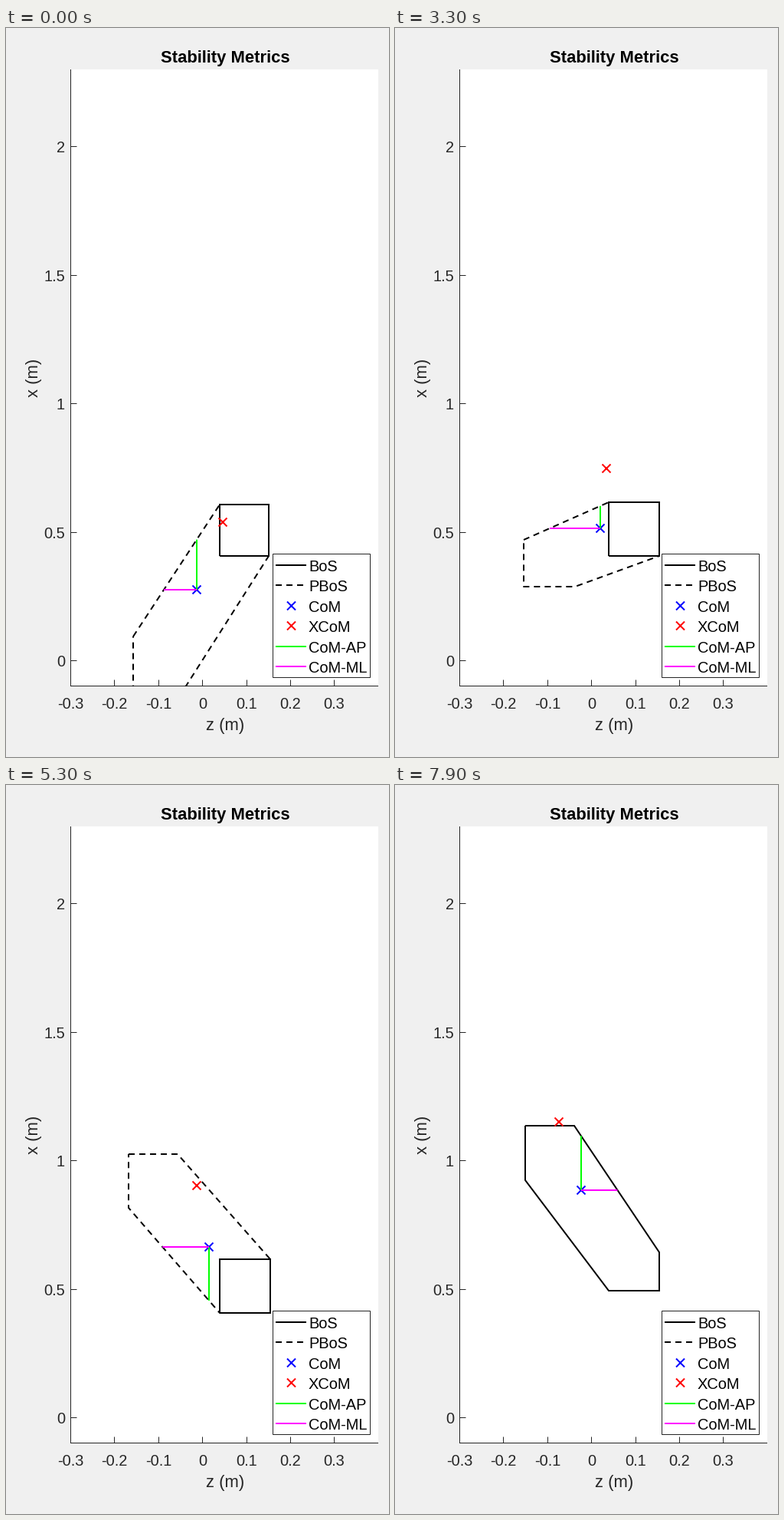
A matplotlib script for the animation above (8 s loop, 500 px wide and 950 px high).

```python
import numpy as np
import matplotlib.pyplot as plt
from matplotlib.animation import FuncAnimation
from matplotlib.patches import Rectangle

W, H, DPI = 500, 950, 100
FRAMES, HOLD, SPAN = 80, 4, 75
HEEL_OFF, CONTACT = 57, 68
PT = 72 / DPI
INK = "#262626"
LEFT, RIGHT, TOP, BOTTOM = 84.5, 486, 54, 857.5

plt.rcParams["font.family"] = "Liberation Sans"
plt.rcParams["path.snap"] = False
fig = plt.figure(figsize=(W / DPI, H / DPI), dpi=DPI, facecolor="#f0f0f0")
ax = fig.add_axes([0, 0, 1, 1])
ax.set_xlim(0, W)
ax.set_ylim(H, 0)
ax.axis("off")


# ---- motion, in pixels against the step number 0..SPAN ----

def poly(*keys):
    """Polynomial through evenly spaced key values."""
    return np.poly1d(np.polyfit(np.linspace(0, SPAN, len(keys)), keys, len(keys) - 1))


def glide(*keys):
    """Smooth cubic path through evenly spaced key values."""
    slope = np.gradient(keys)

    def at(s):
        u = s / SPAN * (len(keys) - 1)
        i = min(int(u), len(keys) - 2)
        u -= i
        ease = u * u * (3 - 2 * u)
        return (keys[i] + (keys[i + 1] - keys[i]) * ease
                + u * (1 - u) * ((1 - u) * slope[i] - u * slope[i + 1]))
    return at


com_path = poly(248.5, 267.2, 265, 243.5), poly(731.5, 662, 599, 528.5)
xcom_path = poly(282.5, 279.5, 248, 214.5), poly(643.5, 595.5, 553.6, 499.5, 438.5)
swing_path = (
    glide(166.3, 166.5, 169.5, 164, 160.5, 170, 170),
    glide(233.5, 233.5, 237.5, 226.5, 224, 233, 233.5),
    glide(793, 776, 702, 583.5, 475.5, 447.8, 444),
    glide(859, 822, 758, 653, 545, 517.3, 514.5),
)


def snap(v):
    return float(np.floor(v + 0.5))


def at_step(path, s):
    return tuple(snap(f(s)) for f in path)


def corners(l, r, t, b):
    return [(l, b), (l, t), (r, t), (r, b)]


def stance_foot(s):
    settle = 3 * np.exp(-s / 4)
    rise = 0.091 * max(0, s - HEEL_OFF) ** 2
    edges = 279, 344.7 - 0.7 * settle, 618 + settle - 0.3 * rise, 688 - rise
    return corners(*map(snap, edges))


def swing_foot(s):
    return corners(*at_step(swing_path, s))


# ---- geometry ----

def turn(a, b, c):
    return (b[0] - a[0]) * (c[1] - a[1]) - (b[1] - a[1]) * (c[0] - a[0])


def hull(points):
    def chain(pts):
        out = []
        for p in pts:
            while len(out) > 1 and turn(out[-2], out[-1], p) <= 0:
                out.pop()
            out.append(p)
        return out[:-1]

    pts = sorted(points)
    return chain(pts) + chain(pts[::-1])


def nearest_edge(outline, p, axis):
    """Closest crossing of the outline on the line through p with p[axis] fixed."""
    other = 1 - axis
    hits = []
    for a, b in zip(outline, outline[1:] + outline[:1]):
        da, db = a[axis] - p[axis], b[axis] - p[axis]
        if da * db < 0:
            hits.append(a[other] + (b[other] - a[other]) * da / (da - db))
    return min(hits, key=lambda v: abs(v - p[other]), default=p[other])


def closed(outline):
    return zip(*(outline + outline[:1]))


def cross(x, y, r=5.5):
    return [x - r, x + r, np.nan, x - r, x + r], [y - r, y + r, np.nan, y + r, y - r]


# ---- drawing ----

def label(x, y, s, size=20, **kw):
    kw = {"color": INK, "ha": "center", **kw}
    ax.text(x, y, s, fontsize=size * PT, va="baseline", zorder=8, **kw)


def line(xs, ys, color, width=2, **kw):
    return ax.plot(xs, ys, color=color, lw=width * PT, solid_capstyle="butt",
                   dash_capstyle="butt", solid_joinstyle="miter", **kw)[0]


STYLES = [
    ("BoS", "#000000", "-"),
    ("PBoS", "#000000", (0, (4, 3))),
    ("CoM", "#0000ff", "-"),
    ("XCoM", "#ff0000", "-"),
    ("CoM-AP", "#00ff00", "-"),
    ("CoM-ML", "#ff00ff", "-"),
]


def draw_axes():
    ax.add_patch(Rectangle((LEFT, TOP), RIGHT - LEFT, BOTTOM - TOP, fc="white", lw=0, zorder=0))
    axis = dict(color=INK, width=1, zorder=1)
    line([LEFT, LEFT], [TOP, BOTTOM + 0.5], **axis)
    line([LEFT, RIGHT], [BOTTOM, BOTTOM], **axis)
    for i in range(-3, 4):
        x = np.floor(256.7 + 57.4 * i) + 0.5
        line([x, x], [BOTTOM, BOTTOM - 8], **axis)
        label(x, 887, f"{i / 10:g}")
    for i in range(5):
        y = np.floor(824.5 - 167.5 * i) + 0.5
        line([LEFT, LEFT + 8], [y, y], **axis)
        label(77, y + 7.5, f"{i / 2:g}", ha="right")
    label(286, 45, "Stability Metrics", 22, color="black", weight="bold")
    label(286, 915, "z (m)", 22)
    label(42, 456, "x (m)", 22, rotation=90, rotation_mode="anchor")


def draw_legend():
    ax.add_patch(Rectangle((348.5, 685.5), 127, 161, fc="white", ec=INK, lw=PT, zorder=6))
    for i, (name, color, dash) in enumerate(STYLES):
        y = np.floor(700 + 26.5 * i)
        xs, ys = cross(372.5, y) if name in ("CoM", "XCoM") else ([352, 392], [y, y])
        line(xs, ys, color, ls=dash, zorder=7)
        label(395, y + 8, name, ha="left", color="black")


draw_axes()
draw_legend()
plot_area = Rectangle((LEFT, TOP), RIGHT - LEFT, BOTTOM - TOP + 0.5, transform=ax.transData)
parts = [line([], [], color, ls=dash, zorder=2 + i / 10)
         for i, (_, color, dash) in enumerate(STYLES)]
for part in parts:
    part.set_clip_path(plot_area)
bos, pbos, com, xcom, ap, ml = parts


def update(frame):
    s = max(0, frame - HOLD)
    stance = stance_foot(s)
    outline = hull(stance + swing_foot(s))
    if s < CONTACT:
        bos.set_data(*closed(stance))
        pbos.set_data(*closed(outline))
    else:
        bos.set_data(*closed(outline))
        pbos.set_data([], [])
    x, y = p = at_step(com_path, s)
    com.set_data(*cross(x, y))
    xcom.set_data(*cross(*at_step(xcom_path, s)))
    ap.set_data([x, x], [y, nearest_edge(outline, p, 0)])
    ml.set_data([x, nearest_edge(outline, p, 1)], [y, y])
    return parts


anim = FuncAnimation(fig, update, frames=FRAMES, interval=100,
                     init_func=lambda: update(0), repeat=True, repeat_delay=0)
plt.show()
```
